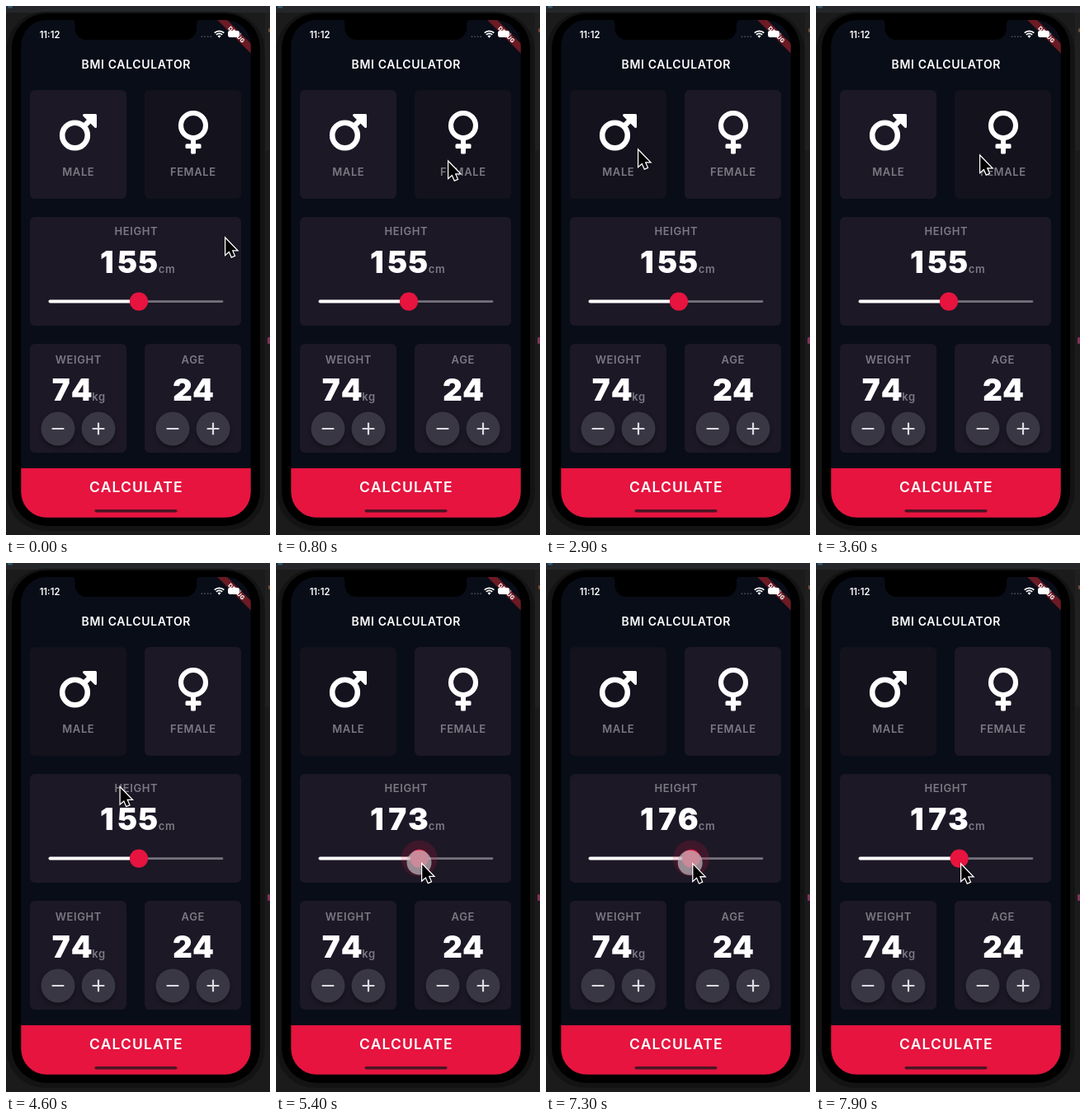
Recreate the animation shown at these times as an HTML page with a canvas. Size 320x642 px, loop 8 s.

```html
<!DOCTYPE html>
<html lang="en">
<head>
<meta charset="utf-8">
<title>BMI calculator</title>
<style>
  html, body { margin: 0; width: 100%; height: 100%; overflow: hidden; background: #1b1b1b; }
  canvas { display: block; width: 100vw; height: 100vh; }
</style>
</head>
<body>
<canvas id="stage"></canvas>
<script>
const W = 320, H = 642, LOOP = 8000, STEP = 100;
const canvas = document.getElementById('stage');
const ctx = canvas.getContext('2d');
const ratio = Math.max(1, window.devicePixelRatio || 1);
canvas.width = W * ratio;
canvas.height = H * ratio;

const C = {
  screen: '#090d18', active: '#1c1826', idle: '#13121d', label: '#7b7983',
  red: '#e6143f', round: '#393744', white: '#fff'
};

// Each key is [time, ...values].
const POINTER = [
  [0, 265, 280], [100, 265, 280], [600, 208, 187], [800, 208, 187],
  [1500, 112, 174], [2100, 111, 173], [2900, 111, 173], [3500, 198, 180],
  [3700, 198, 180], [4200, 112, 178], [4400, 112, 178], [4800, 163, 363],
  [4900, 163, 363], [5400, 176, 363.5], [6800, 182, 363.5], [7600, 175, 364]
];
const HEIGHT = [[4900, 155], [5400, 173], [6800, 183], [7600, 173]];
const PRESSES = [[1600, 1800], [3400, 3500], [4300, 4500], [4900, 7700]];
const DRAG = PRESSES[3];

function sample(keys, t) {
  if (t <= keys[0][0]) return keys[0].slice(1);
  for (let i = 1; i < keys.length; i++) {
    const a = keys[i - 1], b = keys[i];
    if (t < b[0]) {
      const p = (t - a[0]) / (b[0] - a[0]);
      const e = p * p * (3 - 2 * p);
      return a.slice(1).map((v, n) => v + (b[n + 1] - v) * e);
    }
  }
  return keys[keys.length - 1].slice(1);
}

const within = (t, [from, to]) => t >= from && t < to;

function box(x, y, w, h, r, color) {
  ctx.fillStyle = color;
  ctx.beginPath();
  ctx.roundRect(x, y, w, h, r);
  ctx.fill();
}

function disc(x, y, r, color) {
  ctx.fillStyle = color;
  ctx.beginPath();
  ctx.arc(x, y, r, 0, Math.PI * 2);
  ctx.fill();
}

function line(x1, y1, x2, y2, width, color, cap = 'butt') {
  ctx.strokeStyle = color;
  ctx.lineWidth = width;
  ctx.lineCap = cap;
  ctx.beginPath();
  ctx.moveTo(x1, y1);
  ctx.lineTo(x2, y2);
  ctx.stroke();
}

function ring(x, y, r, width) {
  ctx.strokeStyle = C.white;
  ctx.lineWidth = width;
  ctx.beginPath();
  ctx.arc(x, y, r, 0, Math.PI * 2);
  ctx.stroke();
}

function setFont(size, weight, spacing) {
  ctx.font = `${weight} ${size}px Inter, sans-serif`;
  ctx.letterSpacing = spacing + 'px';
}

// Centres capitals on (x, y).
function label(text, x, y, size, weight, color, spacing = 0) {
  setFont(size, weight, spacing);
  ctx.textAlign = 'center';
  ctx.fillStyle = color;
  ctx.fillText(text, x + spacing / 2, y + size * 0.364);
}

const caption = (text, x, y) => label(text, x, y, 13, 600, C.label, 0.6);

// Figures sit on an even pitch, with the unit right behind them.
function reading(value, unit, x, baseline) {
  const pitch = 25;
  setFont(13, 600, 0.6);
  const unitWidth = unit ? ctx.measureText(unit).width : 0;
  const left = x - (value.length * pitch + unitWidth) / 2;
  ctx.textAlign = 'left';
  ctx.fillStyle = C.label;
  ctx.fillText(unit, left + value.length * pitch, baseline);
  setFont(37, 900, 0);
  ctx.textAlign = 'center';
  ctx.fillStyle = C.white;
  [...value].forEach((digit, i) => ctx.fillText(digit, left + (i + 0.5) * pitch, baseline));
}

function male(x, y) {
  ring(x, y, 15.3, 6.6);
  line(x + 10.5, y - 10.5, x + 21, y - 21, 6.6, C.white);
  ctx.lineWidth = 3;
  ctx.lineJoin = 'round';
  ctx.fillStyle = C.white;
  ctx.beginPath();
  ctx.moveTo(x + 11, y - 24.5);
  ctx.lineTo(x + 25, y - 24.5);
  ctx.lineTo(x + 25, y - 10.5);
  ctx.closePath();
  ctx.fill();
  ctx.stroke();
}

function female(x, y) {
  ring(x, y, 15, 6.2);
  box(x - 3, y + 16, 6, 18.5, 1.5, C.white);
  box(x - 9.5, y + 22.3, 19, 5.8, 1.5, C.white);
}

function roundButton(x, plus) {
  ctx.save();
  ctx.shadowColor = 'rgba(0,0,0,.4)';
  ctx.shadowBlur = 5 * ratio;
  ctx.shadowOffsetY = 2.5 * ratio;
  disc(x, 513, 20.5, C.round);
  ctx.restore();
  line(x - 6.5, 513, x + 6.5, 513, 2.2, '#dddbe1', 'round');
  if (plus) line(x, 506.5, x, 519.5, 2.2, '#dddbe1', 'round');
}

function counter(x, title, value, unit) {
  box(x - 58.5, 410, 117, 132, 6, C.active);
  caption(title, x, 428.8);
  reading(value, unit, x, 478.7);
  roundButton(x - 24.5, false);
  roundButton(x + 24.5, true);
}

function slider(value, t) {
  const x = 52 + value * 211 / 300, y = 358.6;
  line(x, y, 262, y, 2.6, '#75737d', 'round');
  line(53.5, y, x, y, 4, C.white, 'round');
  if (within(t, DRAG)) {
    const grow = Math.min(1, (t - DRAG[0] + 100) / 200);
    disc(x, y, 22 * grow, 'rgba(230,20,63,.17)');
  }
  disc(x, y, 11.1, C.red);
}

function backdrop() {
  ctx.fillStyle = '#1b1b1b';
  ctx.fillRect(0, 0, W, H);
  ctx.fillStyle = '#24262a';
  ctx.fillRect(0, 0, W, 8);
  ctx.fillStyle = '#202020';
  ctx.fillRect(314, 8, 6, 167);
  box(2, 0, 6, 2.5, 1, '#31566f');
  box(318, 27, 2, 5, 1, '#7b4a2c');
  box(317, 402, 3, 8, 1, '#7d3359');
  box(0.5, 7, 313, 630, 47, '#131313');
  box(7, 9, 301, 622, 42, '#000');
}

function banner() {
  ctx.save();
  ctx.translate(297, 17);
  ctx.rotate(Math.PI / 4);
  ctx.fillStyle = '#6c1a23';
  ctx.fillRect(-40, 20.4, 80, 8.4);
  label('DEBUG', 0, 24.9, 6.9, 800, C.white, 0.25);
  ctx.restore();
}

function statusBar() {
  ctx.fillStyle = '#000';
  ctx.beginPath();
  ctx.moveTo(79, 16);
  ctx.quadraticCurveTo(83.5, 17, 83.5, 22);
  ctx.lineTo(83.5, 27);
  ctx.arcTo(83.5, 41, 98, 41, 14);
  ctx.lineTo(217, 41);
  ctx.arcTo(231, 41, 231, 27, 14);
  ctx.lineTo(231, 22);
  ctx.quadraticCurveTo(231, 17, 235.5, 16);
  ctx.fill();

  label('11:12', 53, 34.5, 11.2, 600, C.white);
  for (let i = 0; i < 4; i++) disc(237.5 + i * 3.6, 37.2, 0.9, '#4d505a');

  ctx.strokeStyle = C.white;
  ctx.lineWidth = 1.7;
  ctx.lineCap = 'butt';
  for (const r of [8.2, 5.2]) {
    ctx.beginPath();
    ctx.arc(258.5, 38.5, r, -Math.PI * 0.75, -Math.PI * 0.25);
    ctx.stroke();
  }
  ctx.fillStyle = C.white;
  ctx.beginPath();
  ctx.moveTo(258.5, 38.8);
  ctx.arc(258.5, 38.5, 2.8, -Math.PI * 0.75, -Math.PI * 0.25);
  ctx.fill();

  box(269, 30, 14, 8, 2.4, C.white);
  box(283.7, 32.5, 1.2, 3, 0.6, '#b9a5a9');
}

function pointer(x, y) {
  ctx.save();
  ctx.translate(x + 0.8, y + 2);
  ctx.scale(0.84, 0.84);
  ctx.beginPath();
  [[0.5, 0.5], [0.5, 23], [5.7, 18.4], [9.3, 26.6], [13, 25], [9.5, 17], [16.4, 17]]
    .forEach(([px, py]) => ctx.lineTo(px, py));
  ctx.closePath();
  ctx.shadowColor = 'rgba(0,0,0,.4)';
  ctx.shadowBlur = 2 * ratio;
  ctx.shadowOffsetY = ratio;
  ctx.strokeStyle = C.white;
  ctx.lineWidth = 3;
  ctx.lineJoin = 'miter';
  ctx.stroke();
  ctx.shadowColor = 'transparent';
  ctx.fillStyle = '#000';
  ctx.fill();
  ctx.restore();
}

function render(t) {
  ctx.setTransform(canvas.width / W, 0, 0, canvas.height / H, 0, 0);
  backdrop();

  ctx.save();
  ctx.beginPath();
  ctx.roundRect(18.3, 17, 278.4, 603.8, 31);
  ctx.clip();
  ctx.fillStyle = C.screen;
  ctx.fillRect(18, 17, 279, 604);

  label('BMI CALCULATOR', 157.5, 71, 14, 600, C.white, 0.65);

  const maleLit = t < 1700 || within(t, [3500, 4400]);
  box(29, 102, 117, 132, 6, maleLit ? C.active : C.idle);
  box(168, 102, 117, 132, 6, maleLit ? C.idle : C.active);
  male(83.5, 157);
  female(227, 145);
  caption('MALE', 87.5, 201);
  caption('FEMALE', 226.5, 201);

  const [height] = sample(HEIGHT, t);
  box(29, 256, 256, 132, 6, C.active);
  caption('HEIGHT', 157.5, 273);
  reading(String(Math.round(height)), 'cm', 157.5, 323.5);
  slider(height, t);

  counter(87.5, 'WEIGHT', '74', 'kg');
  counter(226.5, 'AGE', '24', '');

  ctx.fillStyle = C.red;
  ctx.fillRect(18, 561, 279, 60);
  label('CALCULATE', 157.3, 583.7, 17.5, 600, C.white, 1.1);
  box(107.5, 611, 100, 3.6, 1.8, '#4a1524');

  banner();
  statusBar();
  ctx.restore();

  const [x, y] = sample(POINTER, t);
  if (PRESSES.some(span => within(t, span))) {
    disc(x - 2.5, y, 15, 'rgba(190,188,192,.7)');
  }
  pointer(x, y);
}

const start = performance.now();
function tick() {
  const t = (performance.now() - start) % LOOP;
  render(Math.floor(t / STEP) * STEP);
  requestAnimationFrame(tick);
}
tick();
</script>
</body>
</html>
```
